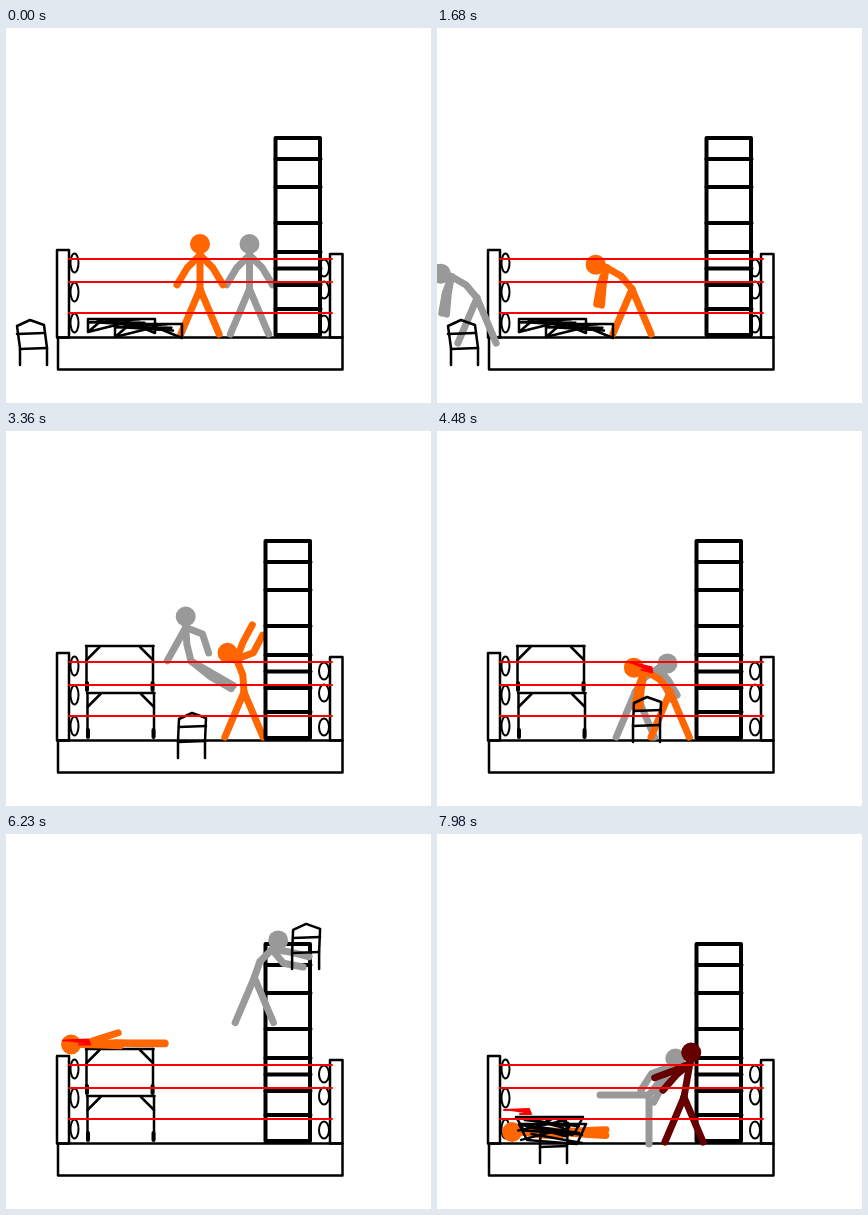
An HTML page with a canvas that plays this animation: 425x375 px, repeating every 8000 ms.

```html
<!DOCTYPE html>
<html lang="en">
<head>
<meta charset="utf-8">
<title>Ring fight</title>
<style>
html, body { margin: 0; width: 100%; height: 100%; overflow: hidden; background: #fff; }
canvas { display: block; }
</style>
</head>
<body>
<canvas id="stage" width="425" height="375"></canvas>
<script>
const ctx = document.getElementById('stage').getContext('2d');
const LOOP = 8000, STEP = 70, GROUND = 261;
const HELD = [29, 30, 32, 61, 63, 66, 79, 92, 106]; // steps that repeat the one before

// Bone angles in degrees, 0 right and 90 down.
// spine: lower, upper, head. arms and legs: upper, lower for each side.
const rest = { spine: [-90, -90, -90], arms: [135, 121, 45, 59], legs: [113, 113, 67, 67] };
const poses = {
  stand: {},
  reach: { spine: [-109, -135, -125], arms: [172, 166, 130, 169] },
  bend: { spine: [-130, -150, -165], arms: [110, 100, 100, 95] },
  lift: { spine: [-133, 183, 170], arms: [-113, -121, -74, -119] },
  fly: { spine: [180, 180, 180], arms: [-43, -27, 47, 35], legs: [2, 2, 37, 37] },
  carry: { arms: [174, -67, -25, -82], legs: [92, 75, 60, 95] },
  kick: { spine: [-104, -94, -90], arms: [119, 119, 21, 72], legs: [39, 30, 30, 30] },
  hit: { spine: [-94, -112, -144], arms: [-69, -62, -21, -62] },
  laid: { spine: [180, 175, 180], arms: [-18, -18, 2, 2], legs: [0, 0, 2, 0] },
  push: { spine: [-83, -90, -90], arms: [-161, -119, -147, -171], legs: [104, 104, 83, 75] },
  flat: { spine: [180, 180, 180], arms: [10, 0, -6, 4], legs: [-3, -2, 5, 3] },
  sit: { spine: [-92, -92, -92], arms: [-167, 162, 49, 71], legs: [186, 180, 171, 177] },
  split: { spine: [-52, -57, -53], arms: [160, 123, 108, 118], legs: [180, 180, 90, 90] },
  grab: { spine: [-80, -80, -83], arms: [156, 160, 140, 131] }
};

// Cues: time, pose ('-' mirrors it), hip x, hip y
const orange = [
  [0, 'stand', 194], [210, '-reach', 191], [420, 'stand', 194], [700, 'lift', 194],
  [1050, 'lift', 194], [1260, 'stand', 194], [1680, 'bend', 195], [1960, 'reach', 196],
  [2590, 'reach', 196], [2870, '-grab', 240], [3080, '-grab', 236], [3360, 'hit', 238],
  [4060, 'hit', 240], [4200, 'bend', 240], [4690, 'bend', 228], [4900, 'laid', 200, 185],
  [5460, 'laid', 110, 209], [6930, 'laid', 110, 209], [7000, 'flat', 120, 227], [7280, 'flat', 120, 298]
];
const grey = [
  [0, 'stand', 243.5], [490, 'bend', 235], [840, 'fly', 215, 213], [980, 'fly', 115, 210],
  [1260, 'flat', 48, 343], [1470, 'flat', 48, 343], [1680, 'bend', 40, 270], [2310, 'bend', 36, 270],
  [2520, 'carry', 21, 264], [2800, 'carry', 97, 205], [3080, 'stand', 150], [3360, 'kick', 185, 230],
  [3500, 'stand', 185], [3780, 'carry', 190, 211], [4060, '-reach', 195], [4690, '-bend', 200],
  [4900, 'carry', 200], [5460, 'push', 167, 258], [5740, '-bend', 195], [5880, '-reach', 240],
  [6300, '-reach', 250, 120], [6440, 'stand', 250, 106], [6650, 'carry', 230, 132], [7000, 'sit', 128, 212],
  [7280, 'sit', 140, 290], [7420, '-bend', 145, 266], [7700, 'stand', 195], [7980, 'split', 212]
];
const rival = [[7490, 'stand', 377, 293], [7770, '-kick', 303], [7980, 'grab', 247, 263]];

// Chair spots; a cue with no place means it is in the grey fighter's hands
const chairCues = [
  [0, 24, 292], [2100, 24, 292], [2310], [2870], [3080, 186, 282], [3500, 186, 282], [3640],
  [4060], [4200, 210, 266], [5600, 210, 266], [5810], [6720], [7000, 114, 205], [7280, 117, 284]
];
const lowTable = { up: 1820, smash: 7140, cues: [[0, 82, 291], [1680, 82, 291], [1890, 81, 262], [7070, 81, 262], [7210, 82, 290]] };
const topTable = { up: 2450, smash: 7000, cues: [[0, 109, 296], [2310, 109, 296], [2520, 80, 215], [6930, 80, 215], [7000, 80, 234], [7280, 79, 283]] };

const clamp = v => Math.min(1, Math.max(0, v));
const ramp = (t, from, to) => clamp((t - from) / (to - from));

// Joints as points: hip, spine, neck, head, then elbow/hand and knee/foot pairs
function joints([, name, x, y = GROUND]) {
  const flip = name[0] === '-' ? -1 : 1;
  const { spine, arms, legs } = { ...rest, ...poses[name.replace('-', '')] };
  const pts = [x, y];
  const bone = (from, deg, len) => {
    const a = deg * Math.PI / 180;
    pts.push(pts[from * 2] + flip * len * Math.cos(a), pts[from * 2 + 1] + len * Math.sin(a));
    return pts.length / 2 - 1;
  };
  spine.forEach((deg, i) => bone(i, deg, i < 2 ? 17 : 11));
  for (const i of [0, 2]) bone(bone(2, arms[i], 18), arms[i + 1], 20);
  for (const i of [0, 2]) bone(bone(0, legs[i], 24), legs[i + 1], 25);
  return pts;
}

function at(cues, t, read = cue => cue.slice(1)) {
  const next = cues.findIndex(cue => cue[0] > t);
  if (next < 0) return read(cues[cues.length - 1]);
  const from = cues[next - 1], to = cues[next];
  const a = read(from), b = read(to), u = ramp(t, from[0], to[0]);
  return a.map((v, i) => v + (b[i] - v) * u);
}

function pen(color, width) {
  ctx.strokeStyle = ctx.fillStyle = color;
  ctx.lineWidth = width;
}
function path(...p) {
  ctx.beginPath();
  for (let i = 0; i < p.length; i += 2) ctx.lineTo(p[i], p[i + 1]);
  ctx.stroke();
}
function oval(x, y, rx, ry) {
  ctx.beginPath();
  ctx.ellipse(x, y, rx, ry, 0, 0, 7);
}
function shifted(x, y, draw) {
  ctx.save();
  ctx.translate(x, y);
  draw();
  ctx.restore();
}

function figure(p, color) {
  const chain = (...ids) => path(...ids.flatMap(k => [p[k * 2], p[k * 2 + 1]]));
  pen(color, 7);
  chain(0, 1, 2, 3);
  chain(2, 4, 5);
  chain(2, 6, 7);
  chain(0, 8, 9);
  chain(0, 10, 11);
  oval(p[6], p[7], 10, 10);
  ctx.fill();
}

function blood(p, lift) {
  const [nx, ny, hx, hy] = p.slice(4, 8);
  shifted(hx, hy - lift, () => {
    ctx.rotate(Math.atan2(ny - hy, nx - hx));
    pen('#f00', 2);
    ctx.beginPath();
    ctx.moveTo(-8, -4);
    ctx.lineTo(17, -5);
    ctx.lineTo(19, 0);
    ctx.fill();
    path(-8, -4, 17, -5, 19, 0, 8, 0);
  });
}

function ring() {
  pen('#000', 2.5);
  ctx.strokeRect(52, 309.5, 284.5, 32);
  ctx.strokeRect(51, 222, 12, 87.5);
  ctx.strokeRect(324, 226, 12.5, 83.5);
  pen('#000', 2);
  for (const y of [235, 264, 295]) {
    oval(68.5, y, 4, 9.5);
    ctx.stroke();
  }
  for (const y of [240, 262, 296]) {
    oval(318, y, 5, 8.5);
    ctx.stroke();
  }
}

function ropes() {
  pen('#f00', 2);
  for (const y of [231, 254, 285]) path(63, y, 326, y);
}

function ladder(x) {
  shifted(x, 0, () => {
    pen('#000', 4);
    ctx.strokeRect(0, 110, 44.5, 197);
    for (const y of [131, 159, 195, 224, 240.5, 257, 281]) path(0, y, 45, y);
  });
}

function chair(x, y, lean) {
  shifted(x, y, () => {
    pen('#000', 2.5);
    const left = lean - 14, right = lean + 13;
    path(left, 45, left, 28, -13, 6, 0, 0, 14, 5, right, 28, right, 45);
    path(-13, 14, 14, 13);
    path(left, 29, right, 28);
  });
}

function standing() {
  path(0, 0, 67.5, 0);
  for (const side of [1, -1]) {
    const x = side > 0 ? 0.5 : 67;
    pen('#000', 2.5);
    path(x, 0, x, 44);
    path(x, 14, x + side * 13, 1);
    pen('#000', 4);
    path(x + side / 2, 37, x + side / 2, 44);
  }
}

// Seeded cross strokes between the two ends of a table
function scribble(count, height, seed) {
  const rnd = () => (seed = seed * 16807 % 2147483647) / 2147483647;
  for (let i = 0; i < count; i++) path(rnd() * 20, rnd() * height, 45 + rnd() * 22, rnd() * height);
}
function folded() {
  path(0, 13, 0, 0, 67, 0, 67, 14, 38, 2);
  path(14, 1, 0, 13, 40, 3);
  scribble(4, 8, 11);
}
function broken(height) {
  path(0, 0, 67, 0, 58, height, 8, height * .8, 0, 0);
  scribble(5, height, 23);
}

function table({ up, smash, cues }, t, height) {
  shifted(...at(cues, t), () => {
    pen('#000', 2.5);
    if (t < up) folded();
    else if (t < smash) standing();
    else broken(height);
  });
}

function render(t) {
  ctx.fillStyle = '#fff';
  ctx.fillRect(0, 0, 425, 375);
  ctx.lineCap = ctx.lineJoin = 'round';

  const o = at(orange, t, joints), g = at(grey, t, joints);
  const inHands = [(g[10] + g[14]) / 2, (g[11] + g[15]) / 2 - 38];
  const seat = at(chairCues, t, cue => cue.length > 1 ? cue.slice(1) : inHands);
  const tables = [[lowTable, 20], [topTable, 10 + 7 * ramp(t, 7000, 7280)]];
  const drawTables = front => tables.forEach(([tb, height]) => {
    const upright = t >= tb.up && t < tb.smash;
    if (upright !== front) table(tb, t, height);
  });
  const drawLadder = () => ladder(269.5 - 10 * ramp(t, 2800, 3080));
  const drawGrey = () => figure(g, '#999');
  const drawOrange = () => {
    figure(o, '#f60');
    if (t >= 4060) blood(o, 18 * ramp(t, 7000, 7280));
  };

  ring();
  drawTables(false);
  if (t >= 5460) drawLadder();
  const fighters = [drawGrey, drawOrange];
  if (t >= 4690) fighters.reverse();
  fighters.forEach(draw => draw());
  if (t >= rival[0][0]) figure(at(rival, t, joints), '#600');
  if (t < 5460) drawLadder();
  drawTables(true);
  chair(...seat, 4 * (1 - ramp(t, 2100, 2310)));
  ropes();
}

const start = performance.now();
function frame(now) {
  let k = Math.floor((Math.max(0, now - start) % LOOP) / STEP);
  while (HELD.includes(k)) k--;
  render(k * STEP);
  requestAnimationFrame(frame);
}
frame(start);
</script>
</body>
</html>
```
